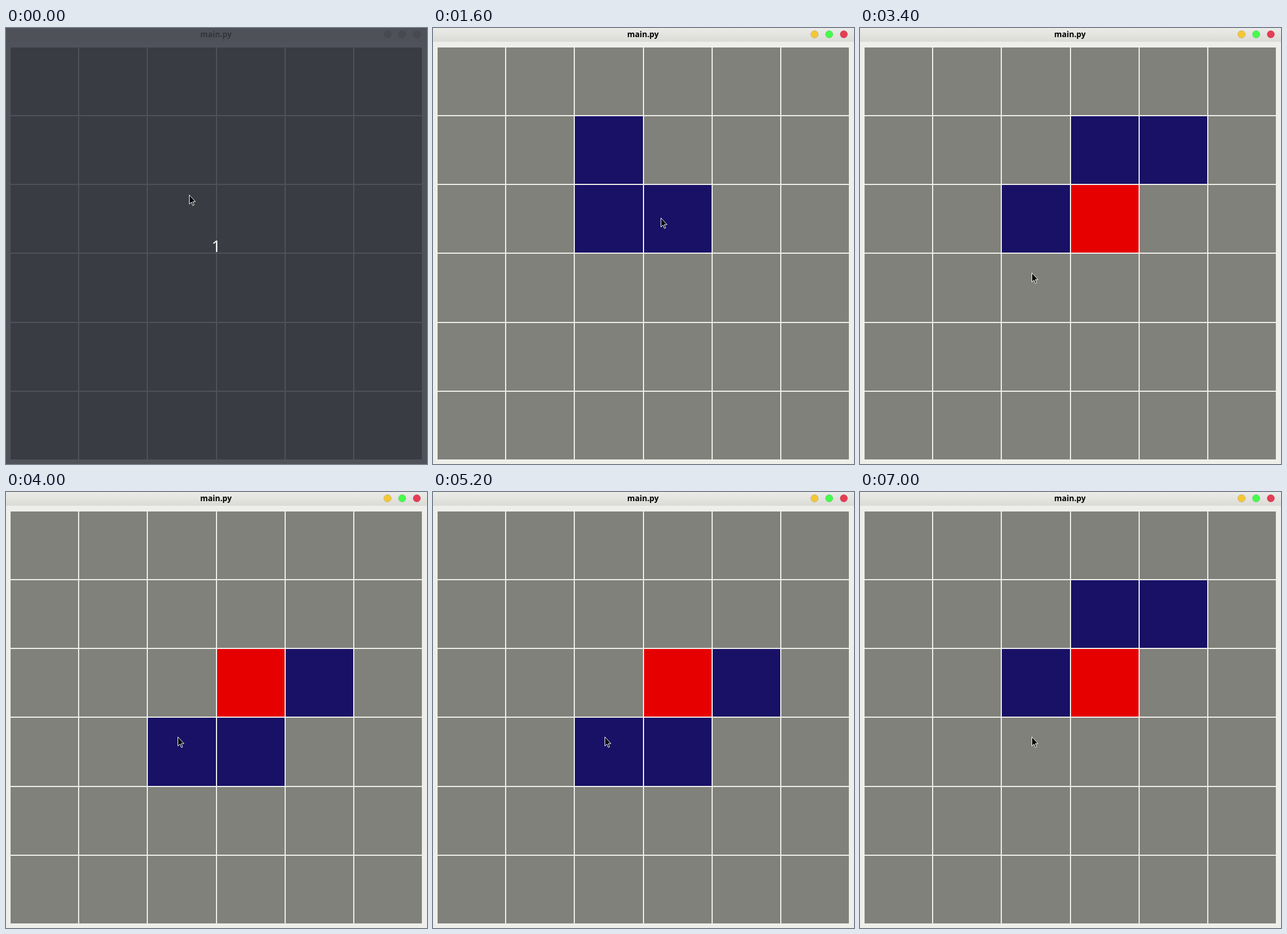
An HTML page with a canvas for the animation above (8000 ms loop, 736x761 px).

```html
<!DOCTYPE html>
<html lang="en">
<head>
<meta charset="utf-8">
<title>main.py</title>
<style>
  html, body { margin: 0; width: 100%; height: 100%; overflow: hidden; background: #eeefeb; }
  canvas { display: block; }
</style>
</head>
<body>
<canvas id="stage" width="736" height="761"></canvas>
<script>
const ctx = document.getElementById('stage').getContext('2d');
const W = 736, H = 761, LOOP = 8000, TICK = 100;
const LEFT = 8, TOP = 33.7, PITCH = 120.2, GAP = 2, SIZE = 6;
const PAPER = '#eeefeb', GREY = '#81817b', BLUE = '#181166', RED = '#e60000';

// The countdown lifts first; the first click focuses the window.
const UNVEIL = 400;
const clicks = [900, 1300, 1600, 2000];
const PIVOT_CLICK = 2900;
const turns = [3400, 3700, 4000, 4200, 4500, 4800, 5200, 5600, 5900, 6200, 6500, 6700, 7000];

// Pointer stops: departure time and place reached, at a fixed speed per tick
const SPEED = 77;
const stops = [
  [0, 320, 291], [500, 305, 212], [900, 309, 285], [1100, 300, 343],
  [1300, 398, 331], [1800, 420, 469], [2300, 416, 328], [2900, 300, 427]
];

function pointerAt(t) {
  const i = stops.findLastIndex(s => t >= s[0]);
  const [begin, x, y] = stops[i];
  const [, px, py] = stops[Math.max(0, i - 1)];
  const steps = Math.max(1, Math.ceil(Math.hypot(x - px, y - py) / SPEED));
  const done = Math.min(1, (Math.floor((t - begin) / TICK) + 1) / steps);
  return [px + (x - px) * done, py + (y - py) * done];
}

// A click marks the cell the pointer was over one tick before.
function clickedCell(t) {
  const [x, y] = pointerAt(t - TICK);
  return [Math.floor((x - LEFT) / PITCH), Math.floor((y - TOP) / PITCH)];
}

const marked = clicks.map(clickedCell);
const pivot = clickedCell(PIVOT_CLICK);

function cell([col, row], color) {
  const edge = (origin, i) => Math.round(origin + PITCH * i);
  const x = edge(LEFT, col), y = edge(TOP, row);
  ctx.fillStyle = color;
  ctx.fillRect(x, y, edge(LEFT, col + 1) - GAP - x, edge(TOP, row + 1) - GAP - y);
}

// Quarter turns clockwise about the pivot
function turned([col, row], quarters) {
  let x = col - pivot[0], y = row - pivot[1];
  while (quarters-- > 0) [x, y] = [-y, x];
  return [pivot[0] + x, pivot[1] + y];
}

function board(t) {
  for (let i = 0; i < SIZE * SIZE; i++) cell([i % SIZE, Math.floor(i / SIZE)], GREY);
  const quarters = turns.filter(s => t >= s).length % 4;
  marked.forEach((c, i) => {
    if (t >= clicks[i]) cell(turned(c, quarters), BLUE);
  });
  if (t >= PIVOT_CLICK) cell(pivot, RED);
}

function text(str, x, y, font, color) {
  ctx.font = font + ' "Noto Sans", "Open Sans", sans-serif';
  ctx.textAlign = 'center';
  ctx.fillStyle = color;
  ctx.fillText(str, x, y);
}

function titleBar(active) {
  const g = ctx.createLinearGradient(0, 0, 0, 24);
  g.addColorStop(0, active ? '#ebebe8' : PAPER);
  g.addColorStop(1, active ? '#dbdbd6' : '#e8e9e5');
  ctx.fillStyle = g;
  ctx.fillRect(0, 0, W, 24);
  text('main.py', 367, 16, 'bold 13.7px', active ? '#000' : '#606060');
  ['#f3c736', '#45fb4b', '#e63c55'].forEach((color, i) => {
    ctx.beginPath();
    ctx.arc(667 + 25.6 * i, 11, 6.5, 0, 7);
    ctx.fillStyle = active ? color : '#c6c7c4';
    ctx.fill();
    ctx.lineWidth = 1;
    ctx.strokeStyle = 'rgba(0, 0, 0, .12)';
    ctx.stroke();
  });
}

const arrow = new Path2D('M.5 .5V16.3L4.1 12.9L6.5 18.9L8.8 17.9L6.4 12.1H11.2Z');

function drawPointer(t) {
  ctx.save();
  ctx.translate(...pointerAt(t));
  ctx.fillStyle = '#000';
  ctx.fill(arrow);
  ctx.lineWidth = 1;
  ctx.strokeStyle = '#fff';
  ctx.stroke(arrow);
  ctx.restore();
}

function draw(t) {
  ctx.fillStyle = PAPER;
  ctx.fillRect(0, 0, W, H);
  titleBar(t >= clicks[0]);
  board(t);
  if (t < UNVEIL) {
    ctx.fillStyle = 'rgba(40, 43, 54, .8)';
    ctx.fillRect(0, 0, W, H);
    text('1', 367.5, 391, '28px', '#f8f8f2');
  }
  drawPointer(t);
}

const start = performance.now();
function tick() {
  draw((performance.now() - start) % LOOP);
  requestAnimationFrame(tick);
}
tick();
</script>
</body>
</html>
```
